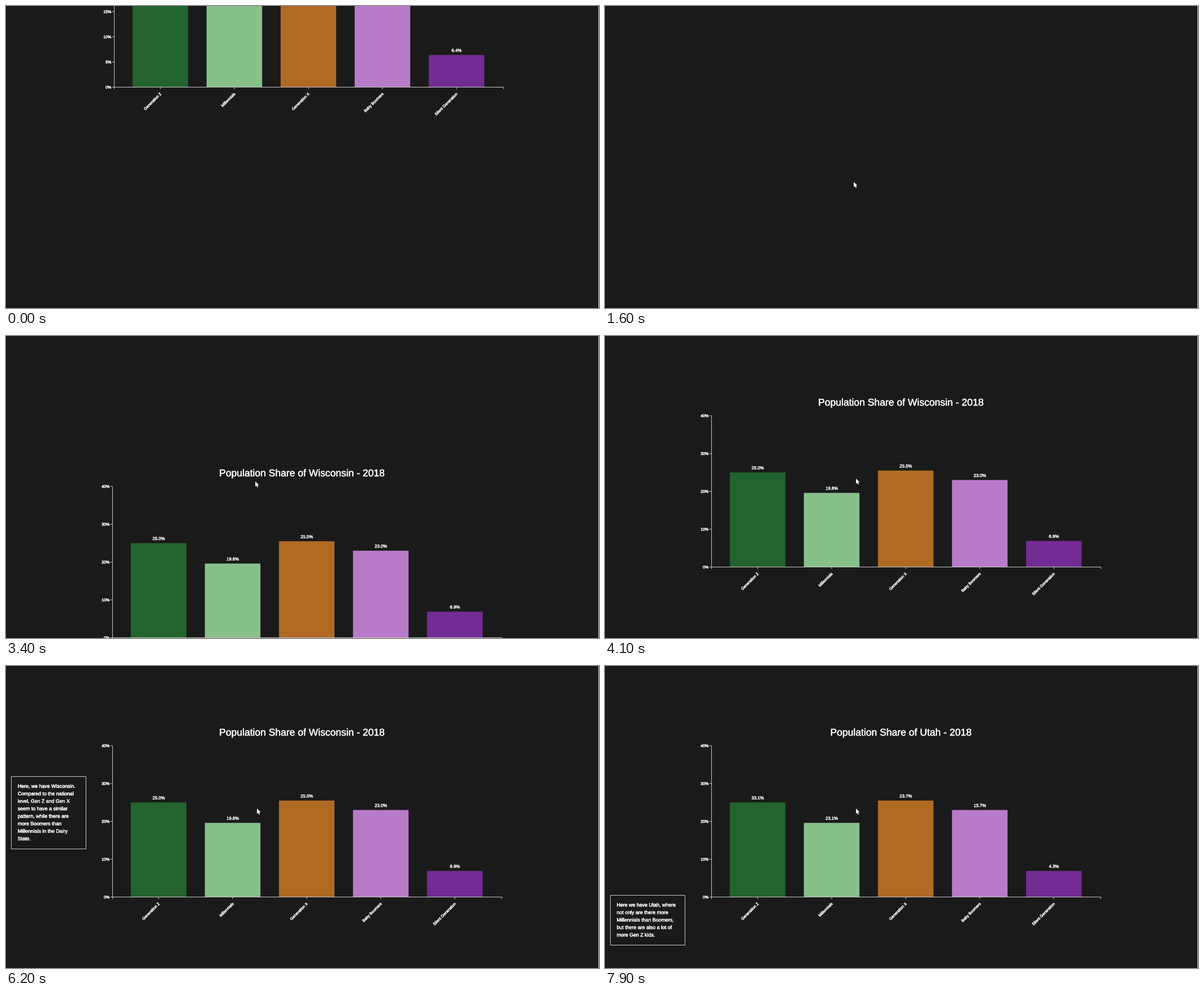
Recreate the animation shown at these times as a matplotlib script. Size 1049 by 534 pixels, loop 8 s.

```python
import matplotlib.pyplot as plt
import numpy as np
from matplotlib.animation import FuncAnimation
from matplotlib.patches import Polygon, Rectangle
from matplotlib.patheffects import withStroke

W, H, DPI = 1049, 534, 100
FRAMES, INTERVAL = 80, 100
PX = 72 / DPI

plt.rcParams["font.family"] = "Liberation Sans"
plt.rcParams["text.hinting"] = "none"
plt.rcParams["path.snap"] = False

BACK, LINE = "#1a1a1a", "#c8c8c8"
COLORS = ["#23632f", "#88c08a", "#b06a24", "#b97bc9", "#722c94"]
NAMES = ["Generation Z", "Millennials", "Generation X",
         "Baby Boomers", "Silent Generation"]
NATION = [22, 22, 20, 21, 6.4]
WISCONSIN = [25.0, 19.6, 25.5, 23.0, 6.9]
UTAH = [33.1, 23.1, 23.7, 15.7, 4.3]

QUESTION = ("Now let's go by state, are their certain states "
            "that have more birth generations than others?")
NOTE_A = ["Here, we have Wisconsin.", "Compared to the national",
          "level, Gen Z and Gen X", "seem to have a similar",
          "pattern, while there are", "more Boomers than",
          "Millennials in the Dairy", "State."]
NOTE_B = ["Here we have Utah, where", "not only are there more",
          "Millennials than Boomers,", "but there are also a lot of",
          "more Gen Z kids."]
NOTE_GAP = 536
TITLE_SWAP = 79
MOUSE_IN = 4

ARROW = 0.9 * np.array([(0, 0), (0, 10.2), (2.3, 8.2), (4, 12), (5.7, 11.2),
                        (4.1, 7.6), (7.2, 7.4)])
STROKE = [withStroke(linewidth=0.35 * PX, foreground="white")]

fig = plt.figure(figsize=(W / DPI, H / DPI), dpi=DPI, facecolor=BACK)
ax = fig.add_axes([0, 0, 1, 1])


def ramp(frame, start, end):
    return min(max((frame - start) / (end - start), 0), 1)


def ease_in_out(u):
    return u ** 3 * (10 - 15 * u + 6 * u * u)


def ease_out(u):
    return u * (2 - u)


def page_scroll(frame):
    """Two long flicks, then shorter steady ones until the chart sticks."""
    return round(220 * ease_in_out(ramp(frame, 11, 16))
                 + 465 * ease_out(ramp(frame, 17, 23))
                 + 225 * ramp(frame, 27, 34)
                 + 50 * ramp(frame, 35, 37)
                 + 75 * ramp(frame, 39, 41))


def note_top(frame):
    return round(560 - 198 * ramp(frame, 56, 59)
                 - 167 * ramp(frame, 60, 62)
                 - 200 * ramp(frame, 62, 64)
                 - 45 * ramp(frame, 65, 69)
                 - 81 * ramp(frame, 72, 79))


def mouse(frame):
    def go(start, end, dx, dy):
        return ramp(frame, start, end) * np.array([dx, dy])

    return (np.array([39, 10])
            + go(4, 10, 370, 244) + go(11, 12, 41, 14)
            + go(12, 16, -10, 43) + go(17, 23, -10, -30)
            + go(24, 27, -5, -21) + go(27, 34, 16, -3)
            + go(35, 37, 3, -5))


def line(xs, ys):
    ax.plot(xs, ys, color=LINE, lw=PX, solid_capstyle="butt")


def label(x, mid, text, size, ha="left"):
    """Text whose capitals are centred on the height mid."""
    ax.text(x, mid + 0.36 * size, text, size=size * PX, color="white",
            ha=ha, va="baseline", path_effects=STROKE)


def frame_box(x, y, w, h):
    ax.add_patch(Rectangle((x, y), w, h, fc=BACK, ec=LINE, lw=PX, zorder=2))


def chart(left, base, unit, top, step, heights, values):
    """Bar chart with its zero line at base; unit is pixels per percent."""
    right, high = left + 688.5, round(base - top * unit) + 0.5
    if base < -60 or high > H + 10:
        return
    for i, (name, height, value) in enumerate(zip(NAMES, heights, values)):
        x = left + 32.3 + 131 * i
        mid, y = x + 49.2, base - height * unit
        ax.add_patch(Rectangle((x, y), 98.3, base - y, fc=COLORS[i], lw=0))
        line([mid, mid], [base, base + 3.5])
        label(mid, y - 8.2, f"{value:.1f}%", 7.7, "center")
        ax.text(mid + 2.4, base + 12.4, name, size=7 * PX, color="white",
                rotation=45, rotation_mode="anchor", ha="right",
                va="baseline", path_effects=STROKE)
    line([left, left, right, right], [base + 3.5, base, base, base + 3.5])
    line([left, left], [base, high])
    for tick in range(0, top + 1, step):
        y = base - tick * unit
        line([left - 4, left], [y, y])
        label(left - 5.3, y, f"{tick}%", 7, "right")


def note(y, lines):
    if -140 < y < H:
        frame_box(9.5, y + 0.5, 132, round(21.8 + 13.25 * len(lines)))
        for i, text in enumerate(lines):
            label(20.7, y + 17.2 + 13.25 * i, text, 8.82)


def draw(frame):
    ax.clear()
    ax.set(xlim=(0, W), ylim=(H, 0))
    ax.axis("off")

    scroll = page_scroll(frame)
    chart(191.5, 143.5 - scroll, 8.9, 30, 5, NATION, NATION)

    y = 835 - scroll
    if -70 < y < H:
        frame_box(263.5, y + 0.5, 520, 61)
        label(286, y + 30.5, QUESTION, 11)

    base = 1443.5 - scroll
    swapped = frame >= TITLE_SWAP
    state = "Utah" if swapped else "Wisconsin"
    label(523.5, base - 291.7, f"Population Share of {state} - 2018",
          17.5, "center")
    chart(188.5, base, 6.69, 40, 10, WISCONSIN,
          UTAH if swapped else WISCONSIN)

    y = note_top(frame)
    note(y, NOTE_A)
    note(y + NOTE_GAP, NOTE_B)

    ax.add_patch(Rectangle((W - 1, 0), 1, H, fc="#dddddd", lw=0))
    if frame >= MOUSE_IN:
        ax.add_patch(Polygon(ARROW + mouse(frame), fc="white", lw=0,
                             zorder=5))
    return []


anim = FuncAnimation(fig, draw, frames=FRAMES, init_func=lambda: [],
                     interval=INTERVAL, repeat=True, repeat_delay=0)
plt.show()
```
